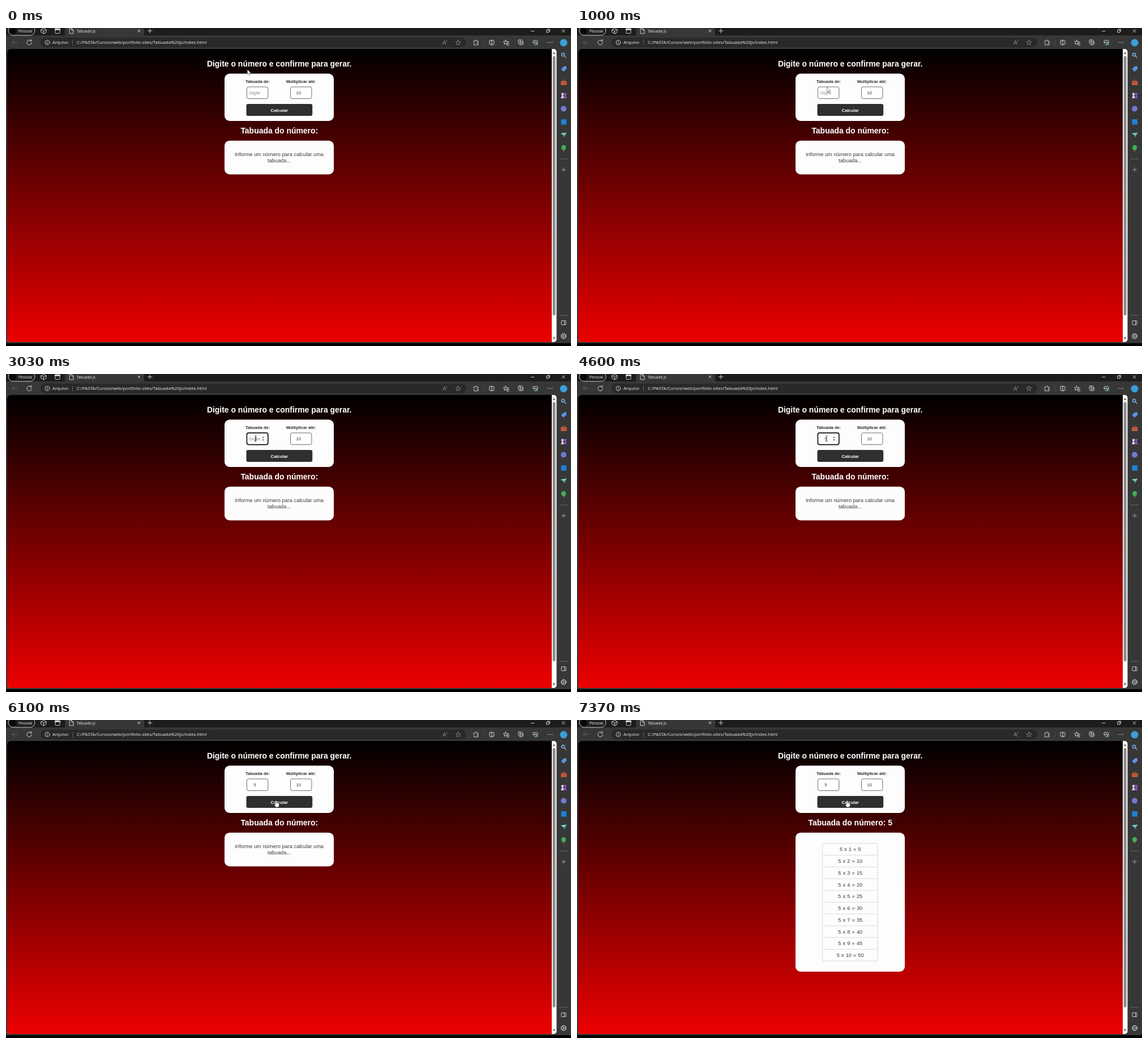
Animation of 998 by 561 pixels, one loop 8 s. Source, as an HTML page:

```html
<!DOCTYPE html>
<html lang="pt">
<head>
<meta charset="utf-8">
<title>Tabuada Js</title>
<style>
html, body { margin: 0; width: 100%; height: 100%; overflow: hidden; background: #000; }
svg { display: block; }
text { font-family: "Liberation Sans", Arial, sans-serif; }
.ui text { font-family: "Open Sans", "Noto Sans", sans-serif; fill: #f0f0f0; }
.mid { text-anchor: middle; }
.bold { font-weight: 700; }
.title { font-size: 13.95px; fill: #fff; }
.label { font-size: 7.4px; fill: #2c2c2c; }
.field { font-size: 7.72px; fill: #333; }
.body { font-size: 9.27px; fill: #3a3a3a; }
.row { word-spacing: .5px; }
.card { fill: #fdfdfd; }
.line { fill: none; stroke: #dedede; stroke-width: .9; stroke-linecap: round; stroke-linejoin: round; }
.input { fill: #fff; stroke: #4a4a4a; stroke-width: .8; }
.input.focus { stroke: #111; stroke-width: 1.7; }
</style>
</head>
<body>
<svg width="998" height="561" viewBox="0 0 998 561">
  <defs>
    <linearGradient id="red" gradientUnits="userSpaceOnUse" x1="0" y1="37" x2="0" y2="595">
      <stop stop-color="#000"/><stop offset="1" stop-color="#f00"/>
    </linearGradient>
  </defs>

  <g class="ui">
    <rect width="998" height="556" fill="#373737"/>
    <rect width="998" height="13" fill="#1c1c1c"/>
    <path d="M104 13V0H244V13Z" fill="#373737"/>
    <rect x="61" y="17" width="752" height="17" rx="8.5" fill="#292929"/>

    <rect x="4" y="-4" width="47" height="17" rx="8.5" fill="#202020" stroke="#c8c8c8"/>
    <circle cx="12" cy="5" r="6" fill="#080808"/>
    <text x="22" y="7.5" font-size="6.8">Pessoal</text>
    <text x="125" y="7.5" font-size="6.6">Tabuada Js</text>
    <text x="82" y="28.2" font-size="7.75">Arquivo</text>
    <text x="125" y="28.2" font-size="7.85">C:/PASTA/Cursos/web/portfolio-sites/Tabuada%20js/index.html</text>

    <g class="line">
      <path d="M62 3L66.500 .8L71 3V7.500L66.500 10L62 7.500ZM62 3L66.500 5.500L71 3M66.500 5.500V10"/>
      <rect x="87" y="1" width="8" height="8.500" rx="1.200"/>
      <path d="M87 2.500H95" stroke-width="2.500"/>
      <path d="M112.500 .8H116L119 3.800V9.800H112.500ZM116 .8V3.800H119"/>
      <path d="M233 3L237 7M237 3L233 7M250.500 5H258M254.200 1.200V8.800"/>
      <path d="M927.500 5.500H933M955 3.700H959V7.700H955ZM956.500 2.200H960.500V6.200M982 2.700L987 7.700M987 2.700L982 7.700"/>
      <path d="M20 25.500H11M14.500 22L11 25.500L14.500 29" stroke="#666"/>
      <path d="M45.500 25.500A4.300 4.300 0 1 1 44 22.200M45 20.200V22.900H42.300"/>
      <circle cx="73" cy="25.500" r="4"/>
      <path d="M73 25V27.500M73 23.300V23.400"/>
      <path d="M117.500 21V30" stroke="#777" stroke-width=".7"/>
      <path d="M771.500 29L774.300 22L777 29M772.500 26.700H776M778 21.500Q779.500 23 778 24.500" stroke="#8c8c8c"/>
      <path d="M826.500 23H828.500Q829 20.500 831 21.300L831.500 23H834V25Q831.500 25.500 832 27H834V29.800H826.500V27.500Q828.300 26.500 826.500 25.500Z"/>
      <path d="M844.500 21V30" stroke="#555" stroke-width=".7"/>
      <rect x="854" y="22" width="8" height="7" rx="1"/>
      <path d="M858 21V30.500"/>
      <path d="M886 25H888.500M885.500 27.500H888.500M884.500 30H888.500"/>
      <rect x="905" y="21" width="7" height="6.500" rx="1.200"/>
      <path d="M907 29.500H911.500A2 2 0 0 0 913.500 27.500V24M908.500 22.500V26M906.800 24.200H910.200"/>
      <path d="M935 30L931 25.500Q930 22 932.800 21.500Q934.500 21.500 935 23Q936 21.300 938 21.600Q940.300 23 938.800 25.500ZM931 25.500H933.500L934.500 24L936 27L937 25.500H939"/>
      <path d="M957.500 25.500H957.600M961 25.500H961.100M964.500 25.500H964.600" stroke-width="1.500"/>
      <path d="M978 231H992M978 507H992" stroke="#777" stroke-width=".8"/>
      <path d="M981.500 250H988.500M985 246.500V253.500" stroke="#aaa"/>
      <rect x="981" y="516.500" width="8" height="7" rx="1"/>
      <path d="M986.500 516.500V523.500"/>
      <circle cx="985" cy="543.500" r="1.500"/>
      <circle cx="985" cy="543.500" r="3.800"/>
      <circle cx="985" cy="543.500" r="4.500" stroke-dasharray="1.800 1.734"/>
      <g id="stars"></g>
    </g>
    <circle cx="938" cy="28.500" r="1.800" fill="#43b05c"/>

    <circle cx="985" cy="26" r="6.500" fill="#3b9fd6"/>
    <circle cx="984" cy="47" r="3" fill="#315f8f" stroke="#a8c8e8"/>
    <path d="M986.500 49.500L989.500 52.500" stroke="#7fa7d0" stroke-width="1.500"/>
    <path d="M980.500 72.500L985.500 67.500H990V72L984.500 77Z" fill="#5b93e8"/>
    <path d="M983 94V92H987.500V94" fill="none" stroke="#b85a35"/>
    <rect x="980" y="94" width="10.500" height="6.500" rx="1" fill="#d2603e"/>
    <path d="M980 96.800H990.500" stroke="#7b3020" stroke-width=".8"/>
    <path d="M980 124L982 119L980.500 116L983 114L985.500 116L984 119L986 124Z" fill="#d8d2e8"/>
    <path d="M985 124L986.500 119L985 114.500H990.500L989 119L990.500 124Z" fill="#8f4dc4"/>
    <circle cx="985" cy="142.500" r="5" fill="#7478cf"/>
    <rect x="980.500" y="161" width="9.500" height="9.500" rx="1" fill="#1f80d2"/>
    <path d="M980 186L990.500 184.500L986 193L984.500 189Z" fill="#48a6a4"/>
    <path d="M980 186L984.500 189L990.500 184.500Z" fill="#8ad0cc"/>
    <path d="M985 213V218" stroke="#9a6a3c" stroke-width="1.600"/>
    <ellipse cx="985" cy="211" rx="4.200" ry="4.600" fill="#3fae58"/>
  </g>

  <rect y="556" width="998" height="5" fill="#000"/>
  <rect x="2" y="37" width="970.500" height="517" rx="5" fill="#fbfbfb"/>
  <path d="M7 37H964V554H7A5 5 0 0 1 2 549V42A5 5 0 0 1 7 37Z" fill="url(#red)"/>
  <rect x="965.700" y="49.500" width="4.800" height="457.500" rx="2.400" fill="#8b8b8b"/>
  <path d="M965.500 46L968 42L970.500 46ZM965.500 545.500L968 549.500L970.500 545.500Z" fill="#777"/>

  <text class="title bold mid" x="482.700" y="67.700">Digite o número e confirme para gerar.</text>
  <rect class="card" x="386" y="80.500" width="193" height="83.500" rx="9"/>
  <text class="label bold mid" x="444.500" y="96.600">Tabuada de:</text>
  <text class="label bold mid" x="521" y="96.600">Multiplicar até:</text>
  <rect id="input" class="input" x="425.400" y="103.900" width="37.400" height="20.700" rx="3"/>
  <rect class="input" x="502.500" y="103.900" width="37.400" height="20.700" rx="3"/>
  <text id="hint" class="field" x="429.800" y="117" style="fill:#8b8b8b">Digite</text>
  <text id="digit" class="field" x="437.300" y="117">5</text>
  <text class="field" x="512.500" y="117">10</text>
  <path id="spin" d="M452 113L454.200 110.300L456.400 113ZM452 115.200L454.200 117.900L456.400 115.200Z" fill="#777"/>
  <rect id="caret" y="109.300" width=".8" height="9.400" fill="#111"/>
  <rect x="424.500" y="134" width="116.700" height="21" rx="3" fill="#2f2f32"/>
  <text class="field bold mid" x="482.800" y="147.500" style="fill:#fff">Calcular</text>

  <text id="heading" class="title bold mid" x="482.800" y="186"></text>
  <rect id="panel" class="card" x="386" y="198.700" width="193" rx="9"/>
  <g id="message" class="body mid">
    <text x="482.500" y="226">Informe um número para calcular uma</text>
    <text x="482.500" y="236.700">tabuada...</text>
  </g>
  <g id="table"></g>

  <g id="arrow"><path d="M.4 .3V9L2.500 7.200L3.900 10.200L5.300 9.500L4 6.700L6.700 6.500Z" fill="#fff" stroke="#444" stroke-width=".6"/></g>
  <g id="beam"><path d="M-1.700 5.200H-.5L0 5.700L.5 5.200H1.700M0 5.700V14.300M-1.700 14.800H-.5L0 14.300L.5 14.800H1.700" fill="none" stroke="#333" stroke-width=".9"/></g>
  <g id="hand"><path d="M-1 .8Q0 -.5 1 .8V4.300Q2 3.700 2.600 4.700Q3.700 4.200 4.100 5.200Q5.400 4.900 5.400 6.200V8.500Q5.200 10 4.300 11.800H-.6Q-1.600 9.800 -3 7.800Q-3.200 6.300 -1.800 6.800L-1 7.500Z" fill="#fff" stroke="#333" stroke-width=".6"/></g>
</svg>
<script>
const LOOP = 8000, BLINK = 533;
// the button takes the focus on press and answers on release
const FOCUS = 1800, TYPED = 4067, PRESS = 6100, RELEASE = 6300;
const $ = id => document.getElementById(id);
const show = (id, on) => { $(id).style.display = on ? '' : 'none'; };

// time, x, y of the pointer tip
const path = [
  [70, 426, 73], [870, 441, 104], [5070, 441, 104],
  [5500, 479, 143], [5770, 477, 142]
];
// time from which each pointer shape is shown
const shapes = [[0, 'arrow'], [1400, 'beam'], [5200, 'arrow'], [5360, 'hand']];

const star = (x, y, r) => {
  const pts = Array.from({ length: 10 }, (_, i) => {
    const a = i * Math.PI / 5, q = i % 2 ? r * .45 : r;
    return [x + q * Math.sin(a), y - q * Math.cos(a)].map(v => v.toFixed(2));
  });
  return `<polygon points="${pts.join(' ')}"/>`;
};
$('stars').innerHTML = `<g stroke="#8c8c8c">${star(798.5, 25.8, 4.6)}</g>` + star(882.5, 25.3, 4.2);

const top0 = 217.7, pitch = 20.75;
let rows = `<rect x="433.7" y="${top0}" width="97.2" height="${pitch * 10}" fill="none" stroke="#d2d2d2" stroke-width=".8"/>`;
for (let n = 1; n <= 10; n++) {
  const y = top0 + pitch * n;
  if (n < 10) rows += `<path d="M433.7 ${y}H530.9" stroke="#d2d2d2" stroke-width=".8"/>`;
  rows += `<text class="body row mid" x="482.8" y="${y - 7.2}">5 x ${n} = ${5 * n}</text>`;
}
$('table').innerHTML = rows;

function pointAt(t) {
  const i = path.findIndex(p => p[0] > t);
  if (i === 0) return path[0].slice(1);
  if (i < 0) return path[path.length - 1].slice(1);
  const [t0, x0, y0] = path[i - 1], [t1, x1, y1] = path[i];
  const k = (t - t0) / (t1 - t0), e = k * k * (3 - 2 * k);
  return [x0 + (x1 - x0) * e, y0 + (y1 - y0) * e];
}

function draw(t) {
  const typed = t >= TYPED, done = t >= RELEASE;
  const focus = t >= FOCUS && t < PRESS;
  const since = t - (typed ? TYPED : FOCUS);

  $('input').classList.toggle('focus', focus);
  show('spin', focus);
  show('hint', !typed);
  show('digit', typed);
  show('caret', focus && Math.floor(since / BLINK) % 2 === 0);
  $('caret').setAttribute('x', typed ? 441.8 : 440.4);

  $('heading').textContent = 'Tabuada do número:' + (done ? ' 5' : '');
  $('panel').setAttribute('height', done ? 245.3 : 59.5);
  show('message', !done);
  show('table', done);

  const shape = shapes.filter(s => s[0] <= t).pop()[1];
  const [x, y] = pointAt(t);
  for (const id of ['arrow', 'beam', 'hand']) show(id, id === shape);
  $(shape).setAttribute('transform', `translate(${x.toFixed(2)} ${y.toFixed(2)})`);
}

const start = performance.now();
function tick() {
  draw((performance.now() - start) % LOOP);
  requestAnimationFrame(tick);
}
tick();
</script>
</body>
</html>
```
